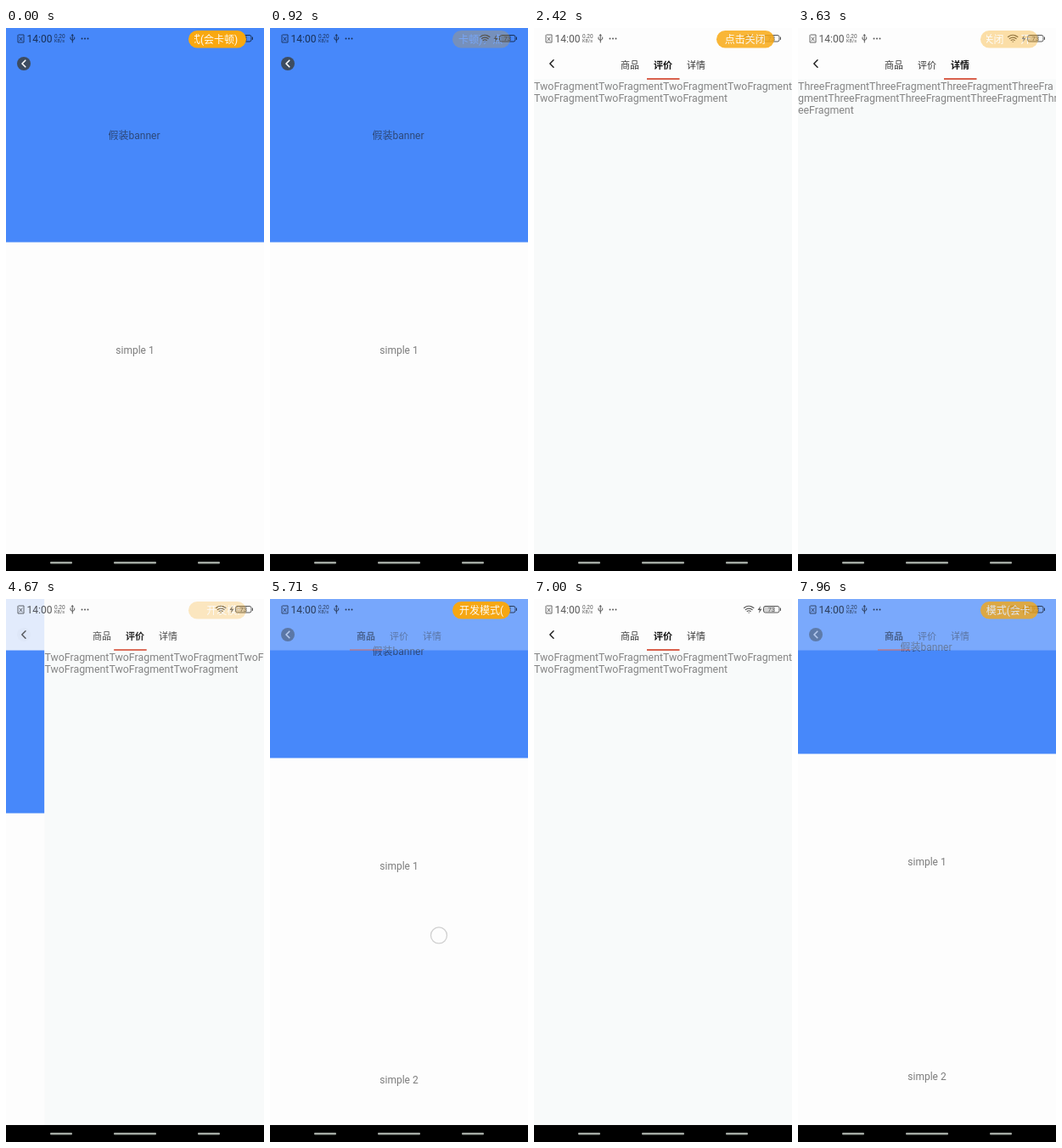
An HTML page for the animation above (8000 ms loop, 304x640 px).

```html
<!DOCTYPE html>
<html lang="zh">
<head>
<meta charset="utf-8">
<title>Tabs and banner</title>
<style>
  html, body { margin: 0; width: 100%; height: 100%; overflow: hidden; background: #fdfdfd; }
  svg { display: block; width: 100vw; height: 100vh; }
  text { font-family: Roboto, "Noto Sans CJK SC", "Noto Sans CJK", sans-serif; white-space: pre; }
  .label { font-size: 12px; text-anchor: middle; fill: #7c7c7c; }
  .body { font-size: 12.38px; fill: #848484; }
  .tab { font-size: 11px; text-anchor: middle; fill: #383838; }
  .tab.on { font-weight: 700; fill: #111; }
  .line { fill: none; stroke-linecap: round; stroke-linejoin: round; }
</style>
</head>
<body>
<svg viewBox="0 0 304 640" preserveAspectRatio="none">
  <defs>
    <clipPath id="pillClip"><rect x="222" y="3" width="53" height="20"/></clipPath>
  </defs>
  <rect width="304" height="640" fill="#fdfdfd"/>

  <g id="pages">
    <g id="list">
      <rect width="304" height="252.5" fill="#4788fa"/>
      <text class="label" x="151" y="131" style="fill:#2d4878">假装banner</text>
      <text class="label" x="152" y="384">simple 1</text>
      <text class="label" x="152" y="636.5">simple 2</text>
    </g>
    <g transform="translate(304 0)">
      <rect width="304" height="640" fill="#f8fafa"/>
      <g id="two" class="body"></g>
    </g>
    <g transform="translate(608 0)">
      <rect width="304" height="640" fill="#f8fafa"/>
      <g id="three" class="body"></g>
    </g>
  </g>

  <rect id="headerBack" width="304" height="60.5" fill="#fdfdfd"/>
  <g id="tabs">
    <text class="tab" x="113" y="47.5">商品</text>
    <text class="tab" x="152" y="47.5">评价</text>
    <text class="tab" x="191" y="47.5">详情</text>
    <rect id="underline" x="94" y="59" width="38.5" height="2" fill="#d9604c"/>
  </g>
  <g id="roundBack">
    <circle cx="21" cy="42" r="8" fill="#3c4244" fill-opacity=".85"/>
    <path class="line" d="M22.8 38.2 19 42l3.8 3.8" stroke="#fff" stroke-width="1.6"/>
  </g>
  <path id="plainBack" class="line" d="M23 37.8 18.8 42l4.2 4.2" stroke="#222" stroke-width="1.5"/>

  <g id="status" fill="#000" stroke="#000" opacity=".65">
    <path class="line" d="M15 8h6v9h-7V9zM16 11l3 4M19 11l-3 4" stroke-width=".9"/>
    <g stroke="none">
      <text x="24.5" y="17" font-size="12">14:00</text>
      <text x="57" y="11.5" font-size="6.5">0.20</text>
      <text x="57" y="17" font-size="5.5">KB/s</text>
      <circle cx="89.5" cy="12.5" r="1"/><circle cx="93" cy="12.5" r="1"/><circle cx="96.5" cy="12.5" r="1"/>
      <path d="M267 8l-3.5 5h2.3l-1 4 3.7-5.2h-2.4z"/>
      <text x="275.5" y="15" font-size="7.5">73</text>
    </g>
    <path class="line" d="M78.3 8v9M76 11v2l2.3 1.6 2.4-1.6v-2M77.3 9l1-1.4 1 1.4" stroke-width="1"/>
    <path class="line" d="M247.5 10.5q5.7-4.5 11.4 0M249.3 12.6q3.9-3 7.8 0M251.2 14.5q2-1.5 4 0M253.2 16v.2" stroke-width="1.2"/>
    <rect class="line" x="270.5" y="8.5" width="18.5" height="7.5" rx="2" stroke-width="1"/>
    <path class="line" d="M290.5 11v2.5" stroke-width="1"/>
    <rect x="271" y="9" width="13" height="6.5" stroke="none" opacity=".25"/>
  </g>

  <g id="pill">
    <rect x="215" y="3" width="68" height="20.5" rx="10.25" fill="#f9a810"/>
    <g clip-path="url(#pillClip)">
      <g id="marquee" font-size="12" fill="#fffbf0">
        <text x="223" y="17.5">开发模式(会卡顿)，点击关闭</text>
        <text x="395" y="17.5">开发模式(会卡顿)，点击关闭</text>
      </g>
    </g>
  </g>

  <circle id="touch" cx="199" r="9.5" fill="#fff" fill-opacity=".3" stroke="#d0d0d0" stroke-width="1.3"/>

  <rect y="620" width="304" height="20" fill="#000"/>
  <g fill="#a2a8a2">
    <rect x="52" y="629" width="26" height="2.5" rx="1"/>
    <rect x="127" y="629" width="50" height="2.5" rx="1"/>
    <rect x="226" y="629" width="26" height="2.5" rx="1"/>
  </g>
</svg>
<script>
const LOOP = 8000, WIDTH = 304, BANNER = 252.5;
const $ = id => document.getElementById(id);
const tabs = [...document.querySelectorAll('.tab')];

function addLines(id, lines) {
  $(id).innerHTML = lines.map((s, i) => `<text x="0" y="${73 + i * 14}">${s}</text>`).join('');
}
const two = 'TwoFragment', three = 'ThreeFragment';
addLines('two', [two.repeat(4), two.repeat(3)]);
addLines('three', [three.repeat(3) + 'ThreeFra', 'gment' + three.repeat(3) + 'Thr', 'eeFragment']);

// Each move: start, end, from, to
const swipes = [[1600, 2000, 0, 1], [2850, 3250, 1, 2], [4000, 4400, 2, 1], [4650, 5050, 1, 0],
                [6350, 6750, 0, 1], [7250, 7650, 1, 0]];
const drag = [5250, 6036, 0, 70];

const easeOut = x => 1 - (1 - x) ** 3;
function follow(moves, t) {
  let value = moves[0][2];
  for (const [start, end, from, to] of moves) {
    if (t >= start) value = from + (to - from) * easeOut(Math.min(1, (t - start) / (end - start)));
  }
  return value;
}

function marqueeOffset(t) {
  if (t < 5200) return 42 + t * 0.025;
  return Math.max(0, t - 6950) * 0.025;
}

function draw(now) {
  const t = now % LOOP;
  const page = follow(swipes, t), scroll = follow([drag], t);
  const fade = scroll / BANNER;
  const alpha = fade + (1 - fade) * Math.min(1, page);

  $('pages').setAttribute('transform', `translate(${-page * WIDTH} 0)`);
  $('list').setAttribute('transform', `translate(0 ${-scroll})`);
  $('headerBack').setAttribute('opacity', alpha);
  $('tabs').setAttribute('opacity', alpha ** 0.6);
  $('roundBack').setAttribute('opacity', (1 - alpha) ** 2);
  $('plainBack').setAttribute('opacity', alpha ** 2);
  $('underline').setAttribute('x', 94 + page * 39);
  tabs.forEach((tab, i) => tab.classList.toggle('on', i === Math.round(page)));

  $('pill').setAttribute('opacity', 0.5 + 0.5 * Math.cos(2 * Math.PI * t / 2800));
  $('marquee').setAttribute('transform', `translate(${-marqueeOffset(t)} 0)`);

  $('touch').setAttribute('opacity', t >= drag[0] && t < drag[1] ? 1 : 0);
  $('touch').setAttribute('cy', 461.5 - scroll);
}

const begin = performance.now();
function tick() {
  draw(performance.now() - begin);
  requestAnimationFrame(tick);
}
tick();
</script>
</body>
</html>
```
